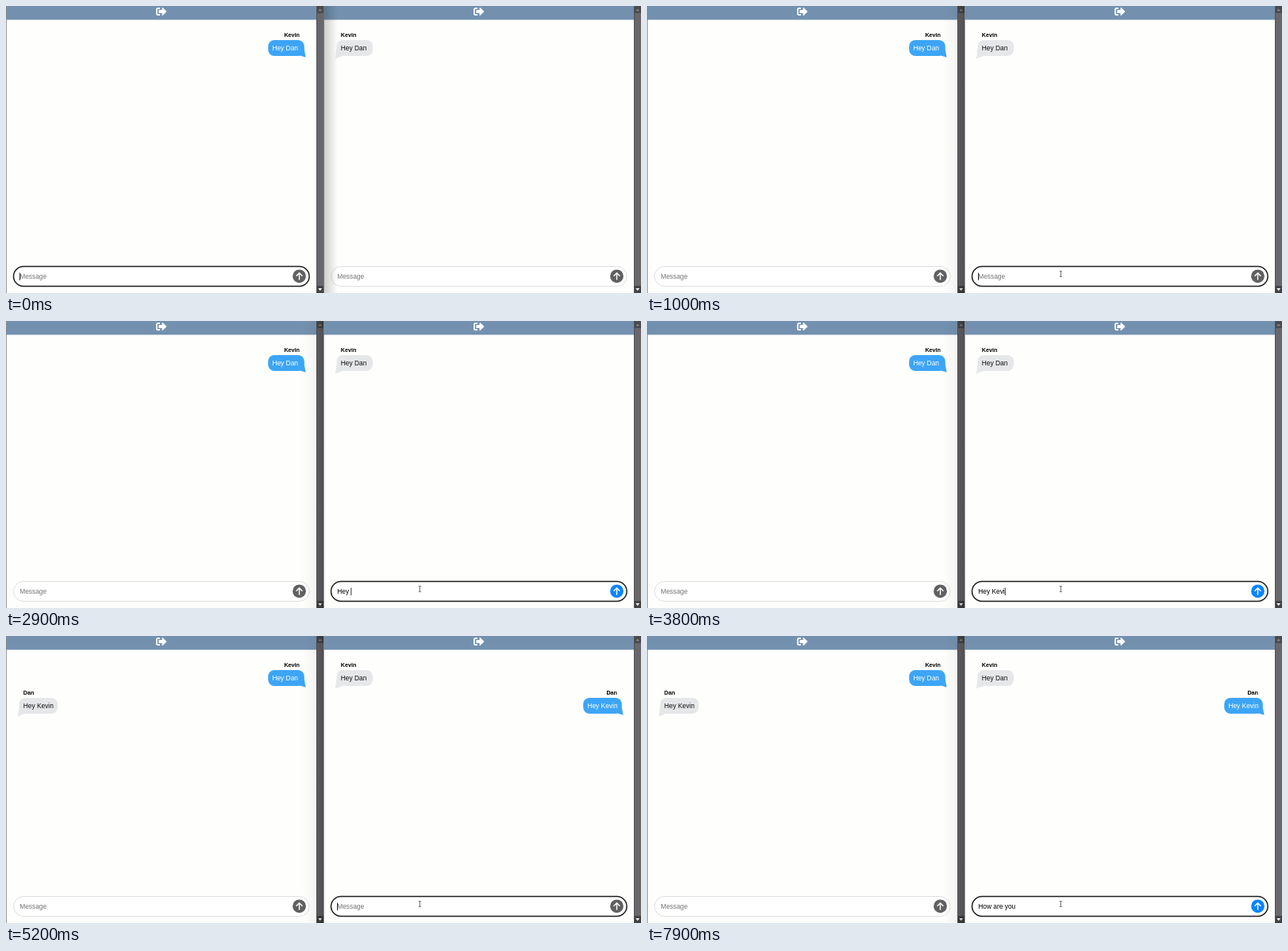
An HTML page with a canvas for the animation above (8 s loop, 800 by 362 pixels).

```html
<!DOCTYPE html>
<html lang="en">
<head>
<meta charset="utf-8">
<title>Two chat windows</title>
<style>
html, body { margin: 0; width: 100%; height: 100%; overflow: hidden; background: #fefefd; }
canvas { display: block; text-rendering: geometricPrecision; }
</style>
</head>
<body>
<canvas id="stage" width="800" height="362"></canvas>
<script>
const ctx = document.getElementById('stage').getContext('2d');
const LOOP = 8000, FACE = '"Liberation Sans", Arial, sans-serif';
const BODY = '8.4px ' + FACE, BOLD = 'bold 7.2px ' + FACE;

const FOCUS = 700, RECEIVED = 4350, SENT = 4450, CARET_END = 7200;
const first = 'Hey Kevin', second = 'How are you';
const firstKeys = [1600, 1800, 2000, 2500, 3000, 3200, 3450, 3700, 3950];
const secondKeys = [...second].map((_, i) => 5300 + i * 140);

const exitIcon = new Path2D(
  'M497 273L329 441c-15 15-41 4-41-17v-96H152q-24 0-24-24v-96q0-24 24-24h136V88c0-21 26-32 41-17l168 168q14 17 0 34z' +
  'M192 436v-40q0-12-12-12H96q-32 0-32-32V160q0-32 32-32h84q12 0 12-12V76q0-12-12-12H96q-96 0-96 96v192q0 96 96 96h84q12 0 12-12z');

function rect(x, y, w, h, fill) {
  ctx.fillStyle = fill;
  ctx.fillRect(x, y, w, h);
}

function text(str, x, y, fill = '#000', font = BODY, align = 'left') {
  ctx.font = font;
  ctx.textAlign = align;
  ctx.fillStyle = fill;
  ctx.fillText(str, x, y);
}

function polygon(points, fill) {
  ctx.beginPath();
  points.forEach(p => ctx.lineTo(...p));
  ctx.fillStyle = fill;
  ctx.fill();
}

function line(points, color, width) {
  ctx.beginPath();
  points.forEach(p => ctx.lineTo(...p));
  ctx.strokeStyle = color;
  ctx.lineWidth = width;
  ctx.stroke();
}

function shade(x0, x1, from, to) {
  const g = ctx.createLinearGradient(x0, 0, x1, 0);
  g.addColorStop(0, `rgba(0,0,0,${from})`);
  g.addColorStop(1, `rgba(0,0,0,${to})`);
  rect(x0, 0, x1 - x0, 362, g);
}

function bubble(name, str, y, w, mine) {
  const fill = mine ? '#3da5f6' : '#e5e7e8';
  const x = mine ? 375.8 - w : 16.5, b = y + 20;
  polygon(mine ? [[375.8, b - 8], [377.6, b + 1.8], [369, b - 1]]
               : [[16.5, b - 8], [14.8, b + 3.4], [25, b - 0.5]], fill);
  ctx.beginPath();
  ctx.roundRect(x, y, w, 20, 8);
  ctx.fill();
  text(name, mine ? 370 : 21.8, y - 3.6, '#000', BOLD, mine ? 'right' : 'left');
  text(str, x + 5.2, y + 12.6, mine ? '#fff' : '#111');
}

function inputBar(value, focused, caret) {
  ctx.beginPath();
  ctx.roundRect(9.5, 328.5, 372.6, 25, 12.5);
  ctx.fillStyle = '#fff';
  ctx.fill();
  ctx.strokeStyle = focused ? '#1c1c1c' : '#dcdcdc';
  ctx.lineWidth = focused ? 1.5 : 0.9;
  ctx.stroke();

  text(value || 'Message', 17.2, 344.1, value ? '#000' : '#757575');
  if (caret) {
    ctx.font = '84px ' + FACE;
    rect(17.2 + ctx.measureText(value).width / 10, 336.5, 0.8, 9.5, '#000');
  }

  ctx.beginPath();
  ctx.arc(369.5, 340.8, 8.4, 0, 7);
  ctx.fillStyle = value ? '#0a84ff' : '#606060';
  ctx.fill();
  ctx.lineCap = ctx.lineJoin = 'round';
  line([[369.5, 345.1], [369.5, 337]], '#fff', 1.4);
  line([[366, 340.2], [369.5, 336.7], [373, 340.2]], '#fff', 1.4);
}

function pane(x, drawContent) {
  ctx.save();
  ctx.translate(x, 0);
  rect(0, 0, 391, 17.4, '#7391af');
  ctx.save();
  ctx.translate(189, 0.3);
  ctx.scale(0.0262, 0.0262);
  ctx.fillStyle = '#fff';
  ctx.fill(exitIcon);
  ctx.restore();

  rect(391, 0, 9, 362, '#69676b');
  rect(391, 0, 0.8, 362, '#4c4b4e');
  rect(392, 0, 8, 9, '#4b4a4c');
  polygon([[393.4, 6.3], [395.7, 3.6], [398, 6.3]], '#8b8b8b');
  rect(392, 353, 8, 9, '#434244');
  polygon([[393.3, 356], [395.7, 359.2], [398.1, 356]], '#fff');

  drawContent();
  rect(0, 0, 0.8, 362, '#858585');
  ctx.restore();
}

function pointer(t) {
  const x = 521.3, y = 338 + 15 * Math.max(0, (FOCUS - t) / 100);
  ctx.lineCap = 'butt';
  line([[x, y - 3.3], [x, y + 3.3]], '#444', 0.8);
  line([[x - 1.6, y - 3.4], [x + 1.6, y - 3.4]], '#444', 0.7);
  line([[x - 1.6, y + 3.4], [x + 1.6, y + 3.4]], '#444', 0.7);
}

function draw(t) {
  const focused = t >= FOCUS;
  const typed = (str, keys) => str.slice(0, keys.filter(k => k <= t).length);
  const value = t < SENT ? typed(first, firstKeys) : typed(second, secondKeys);
  const lastKey = Math.max(...[FOCUS, ...firstKeys, ...secondKeys].filter(k => k <= t));
  const caret = focused && t < CARET_END && (t - lastKey) % 1000 < 500;

  rect(0, 0, 800, 362, '#fefefd');
  pane(0, () => {
    bubble('Kevin', 'Hey Dan', 43, 45.6, true);
    if (t >= RECEIVED) bubble('Dan', 'Hey Kevin', 78, 48.6, false);
    inputBar('', !focused, !focused && t < 500);
  });
  pane(400, () => {
    bubble('Kevin', 'Hey Dan', 43, 45.6, false);
    if (t >= SENT) bubble('Dan', 'Hey Kevin', 78, 48.6, true);
    inputBar(value, focused, caret);
  });

  // The active window casts its shadow on the other one.
  if (focused) {
    shade(372, 391, 0, 0.04);
    shade(391, 400, 0.1, 0.24);
  } else {
    shade(400, 418, 0.2, 0);
  }
  if (t >= FOCUS - 100) pointer(t);
}

const start = performance.now();
function tick() {
  draw((performance.now() - start) % LOOP);
  requestAnimationFrame(tick);
}
tick();
</script>
</body>
</html>
```
